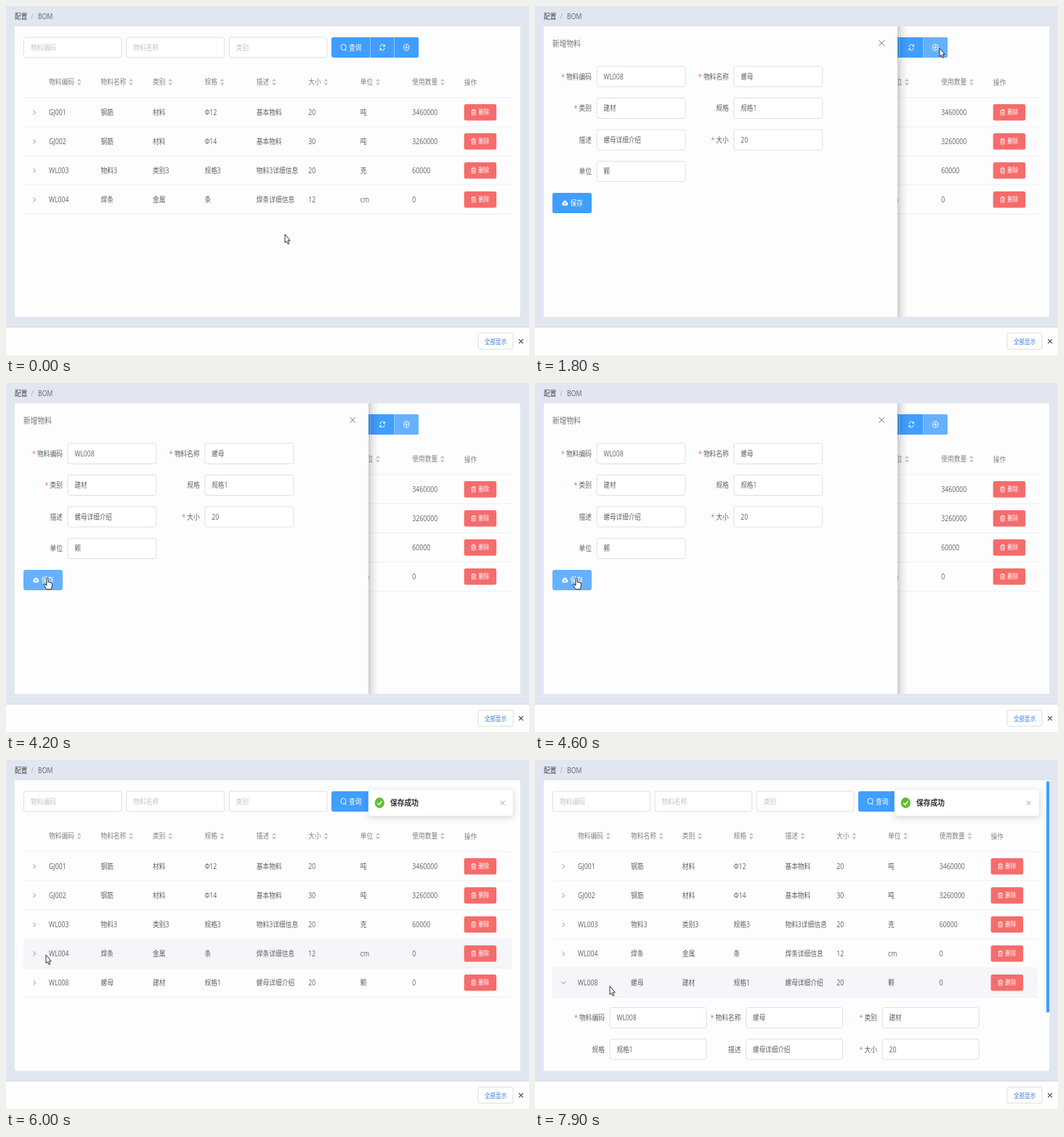
These frames come from a looping animation (720x480 px, 8000 ms). An HTML page:

```html
<!DOCTYPE html>
<html lang="zh-CN">
<head>
<meta charset="utf-8">
<style>
html, body { margin: 0; width: 100%; height: 100%; overflow: hidden; background: #e2e6f0 }
svg { display: block; width: 720px; height: 480px }
text { font-family: "Open Sans", "Noto Sans CJK SC", "Noto Sans CJK", sans-serif; white-space: pre }
.notice { filter: drop-shadow(0 2px 4px rgba(0,0,0,.16)) }
</style>
</head>
<body>
<svg viewBox="0 0 720 480">
  <defs>
    <clipPath id="card"><rect x="12" y="28" width="696" height="399.5"/></clipPath>
    <linearGradient id="shade">
      <stop stop-opacity=".2"/><stop offset=".4" stop-opacity=".08"/><stop offset="1" stop-opacity="0"/>
    </linearGradient>
  </defs>
  <g id="stage"></g>
</svg>
<script>
const LOOP = 8000, BLUE = '#409eff', LIGHT = '#66b1ff', DARK = '#3a8ee6', INK = '#606266';
const ASPECT = .84; // the screen is shown narrower than it is tall

const heads = ['物料编码', '物料名称', '类别', '规格', '描述', '大小', '单位', '使用数量'];
const baseRows = [
  ['GJ001', '钢筋', '材料', 'Φ12', '基本物料', '20', '吨', '3460000'],
  ['GJ002', '钢筋', '材料', 'Φ14', '基本物料', '30', '吨', '3260000'],
  ['WL003', '物料3', '类别3', '规格3', '物料3详细信息', '20', '克', '60000'],
  ['WL004', '焊条', '金属', '条', '焊条详细信息', '12', 'cm', '0'],
];
const newRow = ['WL008', '螺母', '建材', '规格1', '螺母详细介绍', '20', '颗', '0'];
const required = [1, 1, 1, 0, 0, 1, 0];

// time, x, y
const track = [
  [200, 384, 314], [1100, 557, 58], [2100, 557, 58], [3000, 56, 268], [4600, 56, 268], [4800, 55, 268],
  [6050, 55, 268], [6500, 55, 302], [6800, 40, 304], [7450, 40, 304], [7900, 103, 311],
];

const ramp = (t, a, b) => Math.min(1, Math.max(0, (t - a) / (b - a)));
const smooth = p => p * p * (3 - 2 * p);
const easeOut = p => 1 - (1 - p) ** 2;

function cursorAt(t) {
  let [, x, y] = track[0];
  for (let i = 1; i < track.length; i++) {
    const p = smooth(ramp(t, track[i - 1][0], track[i][0]));
    x += (track[i][1] - track[i - 1][1]) * p;
    y += (track[i][2] - track[i - 1][2]) * p;
  }
  return [x, y];
}

const rect = (x, y, w, h, fill, more = '') =>
  `<rect x="${x}" y="${y}" width="${w}" height="${h}" fill="${fill}" ${more}/>`;
const path = (d, color, more = '') =>
  `<path d="${d}" fill="none" stroke="${color}" ${more}/>`;
const group = (body, more) => `<g ${more}>${body}</g>`;
const at = (x, y, body) => group(body, `transform="translate(${x} ${y})"`);

// y is the middle of the line
const text = (x, y, s, color = INK, size = 10.4, more = '') =>
  `<text transform="translate(${x} ${y + size * .375}) scale(${ASPECT} 1)" font-size="${size}" fill="${color}" ${more}>${s}</text>`;
const cross = (x, y, r, color, w = 1) =>
  path(`M${x - r} ${y - r}l${2 * r} ${2 * r}m0 ${-2 * r}l${-2 * r} ${2 * r}`, color, `stroke-width="${w}"`);
const box = (x, y, w) => rect(x, y, w, 28, '#fff', 'rx="3" stroke="#dcdfe6"');

function field(x, y, w, label, value, star) {
  const s = (star ? '<tspan fill="#f56c6c">* </tspan>' : '') + label;
  return text(x - 7, y + 14, s, INK, 10.4, 'text-anchor="end"') +
    box(x, y, w) + text(x + 9.5, y + 14, value, INK, 10.2);
}

function searchBar(c) {
  const step = c.narrow ? 140.4 : 141.4, x0 = c.narrow ? 445 : 448;
  let s = heads.slice(0, 3).map((h, i) =>
    box(24.5 + i * step, 43, step - 6.6) + text(34 + i * step, 57, h, '#c0c4cc')).join('');
  const inBar = c.y > 43 && c.y < 71 && !c.drawer;
  const over = (a, b) => inBar && c.x >= a && c.x < b;
  const plus = c.t >= 1300 ? LIGHT : c.t >= 1150 ? DARK : over(534, 568) ? LIGHT : BLUE;
  s += at(x0, 43,
    rect(0, 0, 120, 28, BLUE, 'rx="3"') +
    rect(53, 0, 33, 28, over(501, 534) ? LIGHT : BLUE) +
    `<path d="M86 0h31q3 0 3 3v22q0 3-3 3h-31z" fill="${plus}"/>` +
    rect(0, 0, 53, 28, '#fff', `opacity="${c.mask * .33}"`) +
    rect(53, 0, 33, 28, '#fff', `opacity="${c.mask * 1.05}"`) +
    rect(86, 0, 34, 28, '#fff', `opacity="${c.mask * .33}"`) +
    path('M53.5 0v28M86.5 0v28', '#8cc5ff') +
    `<ellipse cx="16.6" cy="13.6" rx="3.5" ry="4" fill="none" stroke="#fff"/>` +
    path('M18.5 17l2 2', '#fff') +
    text(24, 14, '查询', '#fff', 10.4, 'font-weight="500"') +
    path('M67 13.5a3.2 3.8 0 0 1 6-1.5m.3-2v2.4h-2M73.2 14.5a3.2 3.8 0 0 1-6 1.5m-.3 2v-2.4h2', '#fff') +
    `<ellipse cx="103.2" cy="14" rx="3.7" ry="4.2" fill="none" stroke="#fff"/>` +
    path('M101 14h4.4M103.2 11.6v4.8', '#fff'));
  return s;
}

function deleteButton(x, y) {
  return at(x, y, rect(0, -11.5, 44.5, 22.5, '#f56c6c', 'rx="2.5"') +
    path('M9.8-2.6h6.6M11.8-2.8v-1.2h2.6v1.2M10.7-2.6v6h4.8v-6M12.3-.8v2.6M13.9-.8v2.6', '#fff', 'stroke-width=".8"') +
    text(19.5, -.4, '删除', '#fff', 9, 'font-weight="500"'));
}

function table(c) {
  const right = c.narrow ? 692 : 696;
  const col = i => !i ? 59 : c.narrow ? 132 + 70.8 * (i - 1) : 130.5 + 71.45 * (i - 1);
  const line = y => path(`M24 ${y}H${right}`, '#ebeef5');
  let s = heads.map((h, i) => {
    const x = col(i) + h.length * 8.74 + 6.7;
    return text(col(i), 104.5, h, '#808389', 10.4, 'font-weight="500"') +
      `<path d="M${x - 3} 103.6l3-3.6 3 3.6zm0 2.2l3 3.6 3-3.6z" fill="#c0c4cc"/>`;
  }).join('') + text(col(8), 105.5, '操作', '#808389', 10.4, 'font-weight="500"') + line(126);

  const rows = c.t >= 5250 ? [...baseRows, newRow] : baseRows;
  rows.forEach((row, i) => {
    const y = 126 + i * 40, mid = y + 20.4;
    const hover = !c.drawer && c.mask < .3 && c.y >= y && c.y < y + 40;
    if (hover) s += rect(24, y + .5, right - 24, 39.5, '#f5f5fa');
    const turn = i == 4 ? 90 * ramp(c.t, 6900, 7100) : 0;
    s += path('M-1.6-3l3 3-3 3', '#85888e', `transform="translate(39.3 ${mid}) rotate(${turn})"`);
    s += row.map((v, k) => text(col(k), mid, v)).join('');
    s += deleteButton(col(8), mid) + line(y + 40);
  });
  return s;
}

function detail() {
  return heads.slice(0, 6).map((h, i) =>
    field(103 + i % 3 * 187.5, 340.5 + (i / 3 | 0) * 43.5, 133, h, newRow[i], required[i])).join('');
}

function drawer(c) {
  let s = rect(499, 28, 14, 400, 'url(#shade)') + rect(12, 28, 487, 400, '#fefdfe') +
    text(24, 51.8, '新增物料', '#72767b', 11.6) + cross(477.3, 51, 3.9, '#72767b');
  s += heads.slice(0, 7).map((h, i) =>
    field(85 + i % 2 * 188.8, 83 + (i >> 1) * 43.5, 122, h, newRow[i], required[i])).join('');
  s += rect(24, 257, 54, 28, c.hand ? LIGHT : BLUE, 'rx="3"') +
    '<path d="M39 274.5a2.3 2.5 0 0 1-.3-4.7a2.7 3.2 0 0 1 5.2 0a2.3 2.5 0 0 1-.3 4.7z" fill="#fff"/>' +
    path('M41.3 273.6v-3m-1.4 1.3l1.4-1.5 1.4 1.5', BLUE, 'stroke-width=".9"') +
    text(48.5, 271, '保存', '#fff', 10.4, 'font-weight="500"');
  return group(s, `transform="translate(${-501 * (1 - c.drawer)} 0)" opacity="${c.t > 4700 && c.drawer < 1 ? .965 : 1}"`);
}

function loading(c) {
  const spin = 115 + (c.t - 4900) * .3, dash = 12 + ramp(c.t, 4900, 5500) * 45;
  return rect(12, 78, 696, 350, '#fff', `opacity="${c.mask}"`) +
    group(`<circle r="16" fill="none" stroke="${BLUE}" stroke-width="1.3" opacity="${c.mask}"
      pathLength="100" stroke-dasharray="${dash} 100" transform="rotate(${spin})"/>`,
      `transform="translate(360 228) scale(${ASPECT} 1)"`);
}

function notice(c) {
  const x = 698 - 199 * easeOut(ramp(c.t, 4830, 5230)) - (c.narrow ? 4 : 0);
  return at(x, 40.5,
    rect(0, 0, 199, 36.5, '#fff', 'rx="4" stroke="#ebeef5" stroke-width=".6" class="notice"') +
    '<ellipse cx="15.3" cy="18.4" rx="6.6" ry="7.3" fill="#5fbf35"/>' +
    path('M12.2 18.6l2.3 2.5 4-5', '#fff', 'stroke-width="1.4"') +
    text(30, 18, '保存成功', '#303133', 11.6, 'font-weight="700"') +
    cross(184.7, 18.5, 2.9, '#909399', .9));
}

function pointer(c) {
  const shape = c.hand
    ? 'M0 1.2Q1.4-.4 2.2 1.4V6q1.2-.8 1.9.4q1.2-.6 1.8.5q1.4-.4 1.5 1.2V12L6 15.8H0L-3.4 10.4Q-4 8.4-2.2 9L0 10.6z'
    : 'M0 0V11.6L2.4 9.4 4.2 13.4 5.8 12.6 4.1 8.7H7.2z';
  return at(c.x, c.y, `<path d="${shape}" fill="#fff" stroke="#26262c" stroke-width=".95" stroke-linejoin="round"/>`);
}

function frame() {
  return text(12, 14, '配置', '#45474d', 10.4, 'font-weight="500"') + text(34.6, 14, '/', '#a8abb3') +
    text(44, 14, 'BOM') + rect(12, 28, 696, 399.5, '#fefdfe') +
    rect(0, 441.5, 720, 39, '#fefefe') + path('M0 441.8H720', '#cdd2dc') +
    rect(650, 450, 48, 22, '#fff', 'rx="2.5" stroke="#dadce0"') +
    text(659, 461.2, '全部显示', '#3b78e7', 9) + cross(709, 461.2, 2.9, '#55585e', 1.3);
}

function scene(t) {
  const [x, y] = cursorAt(t);
  const open = easeOut(ramp(t, 1300, 1600)) - smooth(ramp(t, 4700, 5124));
  const c = {
    t, x, y, drawer: open, narrow: t >= 6900,
    mask: .9 * (ramp(t, 4770, 5070) - ramp(t, 5250, 5550)),
    hand: open == 1 && x > 24 && x < 78 && y > 257 && y < 285,
  };
  let s = searchBar(c) + table(c);
  if (c.narrow) s += detail() + rect(704, 29, 4, 318.5, BLUE, 'rx="2"');
  if (c.mask > 0) s += loading(c);
  if (open > 0) s += drawer(c);
  if (t > 4830) s += notice(c);
  return frame() + group(s, 'clip-path="url(#card)"') + pointer(c);
}

const stage = document.getElementById('stage');
let last = '';
function tick() {
  const next = scene(performance.now() % LOOP);
  if (next !== last) stage.innerHTML = last = next;
  requestAnimationFrame(tick);
}
tick();
</script>
</body>
</html>
```
